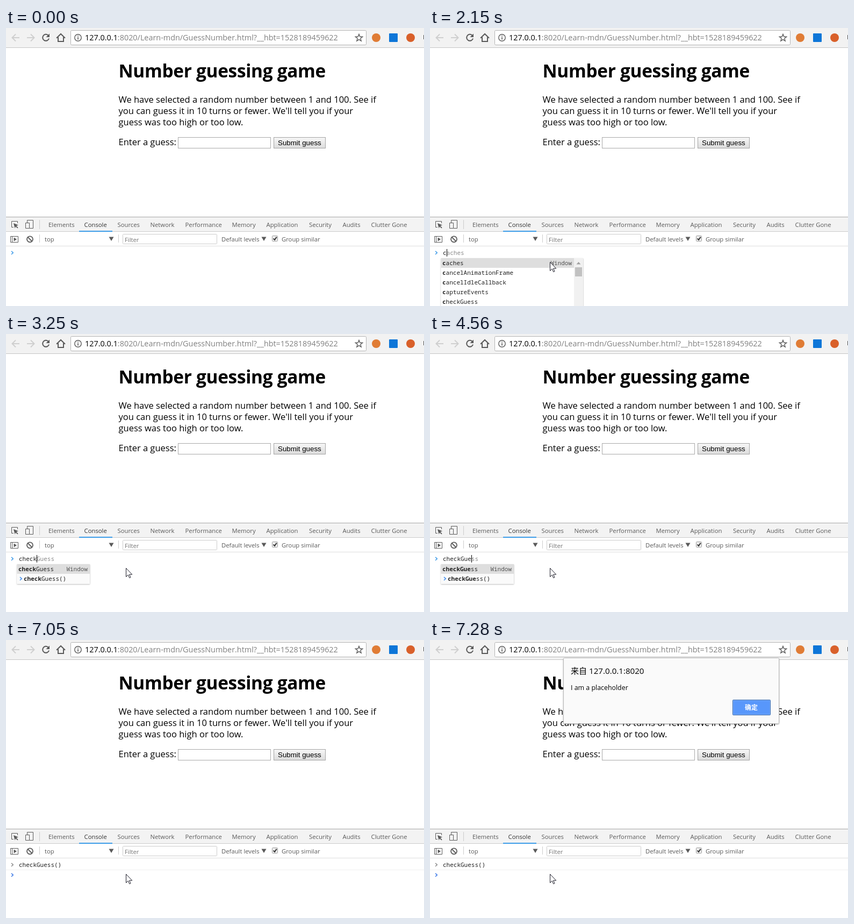
Recreate the animation shown at these times as an HTML page. Size 778 by 517 pixels, loop 8 s.

```html
<!DOCTYPE html>
<html lang="en">
<head>
<meta charset="utf-8">
<title>Number guessing game</title>
<style>
  html, body { margin: 0; width: 100%; height: 100%; overflow: hidden; background: #fff; }
  svg { display: block; }
  text { font-family: "Open Sans", "Noto Sans", "Noto Sans CJK SC", sans-serif; white-space: pre; }
  .page { font-size: 16.5px; }
  .ui { font-size: 11.3px; fill: #5a5a5a; }
  .mono { font-family: "Noto Sans Mono", "DejaVu Sans Mono", monospace; font-size: 11px; fill: #222; }
  .line { fill: none; stroke: #5a5a5a; }
</style>
</head>
<body>
<svg id="stage" width="778" height="517" viewBox="0 0 778 517" xmlns="http://www.w3.org/2000/svg">
  <defs>
    <linearGradient id="btn" x1="0" y1="0" x2="0" y2="1">
      <stop offset="0" stop-color="#f7f7f7"/><stop offset="1" stop-color="#dcdcdc"/>
    </linearGradient>
    <filter id="shadow" x="-5%" y="-10%" width="110%" height="125%">
      <feDropShadow dx="0" dy="1" stdDeviation="1.3" flood-opacity=".35"/>
    </filter>
  </defs>
  <rect width="778" height="517" fill="#fff"/>
  <g id="browser"></g>
  <g id="page"></g>
  <g id="tools"></g>
  <g id="console"></g>
  <g id="popup"></g>
  <path id="cursor" d="M.5 .5V16.5L4.2 13L6.8 18.6L9 17.6L6.5 12.2H11.7Z" fill="#fff" stroke="#1c1c28"/>
  <g id="dialog"></g>
</svg>
<script>
const LOOP = 8000, CHAR = 6.6, COMMAND = 'checkGuess()';
const KEYS = [2150, 2310, 2770, 3090, 3250, 4020, 4330, 4560, 4870, 5030, 5960, 6270];
const SUBMIT = 7050, BLINK = 535;

const el = id => document.getElementById(id);
const text = (x, y, str, cls, attrs = '') => `<text x="${x}" y="${y}" class="${cls}" ${attrs}>${str}</text>`;
const rect = (x, y, w, h, fill, attrs = '') =>
  `<rect x="${x}" y="${y}" width="${w}" height="${h}" fill="${fill}" ${attrs}/>`;
const box = (x, y, w, h, fill, stroke, rx = 0) =>
  rect(x + .5, y + .5, w - 1, h - 1, fill, `stroke="${stroke}" rx="${rx}"`);
const line = (d, attrs = '') => `<path class="line" d="${d}" ${attrs}/>`;
const fillPath = (d, fill) => `<path d="${d}" fill="${fill}"/>`;
const chevron = (x, y, color) =>
  `<path d="M${x} ${y - 3}l3.2 3l-3.2 3" fill="none" stroke="${color}" stroke-width="1.6"/>`;

function star(cx, cy, outer, inner) {
  const pts = Array.from({ length: 10 }, (_, i) => {
    const r = i % 2 ? inner : outer, a = i * Math.PI / 5 - Math.PI / 2;
    return (cx + r * Math.cos(a)).toFixed(2) + ' ' + (cy + r * Math.sin(a)).toFixed(2);
  });
  return 'M' + pts.join('L') + 'Z';
}

function drawBrowser() {
  const pale = 'style="stroke:#cfcfcf" stroke-width="2"', dark = 'stroke-width="2"';
  el('browser').innerHTML =
    rect(0, 0, 778, 36, '#f2f2f2') + rect(0, 36, 778, 1, '#c4c4c4') +
    line('M25 18H12M18 11.5L11.5 18L18 24.5', pale) +
    line('M39 18H52M46 11.5L52.5 18L46 24.5', pale) +
    line('M78.3 13.4A6 6 0 1 0 80 19.5', dark) + fillPath('M81 10.5V17H74.5Z', '#5a5a5a') +
    line('M94 18.7L102 11L110 18.7M97 17V25H107V17', dark) +
    box(120, 4, 551, 28, '#fff', '#b4b4b4', 2) +
    '<circle class="line" cx="134" cy="18" r="6.2" stroke-width="1.4"/>' +
    rect(133.2, 17, 1.6, 4.5, '#5a5a5a') + rect(133.2, 14.2, 1.6, 1.6, '#5a5a5a') +
    text(147, 23, '127.0.0.1<tspan fill="#808080">:8020/Learn-mdn/GuessNumber.html?__hbt=1528189459622</tspan>',
      '', 'font-size="14.4"') +
    line(star(657, 18.4, 7, 3), 'stroke-width="1.4"') +
    '<circle cx="689" cy="18" r="8" fill="#e07c35"/>' +
    rect(713, 10, 16, 16, '#0e76d8', 'rx="1"') +
    '<circle cx="753" cy="18" r="8" fill="#d9602a"/>' +
    rect(777, 13, 1, 8, '#555');
}

function drawPage() {
  el('page').innerHTML =
    text(209.5, 92, 'Number guessing game', '', 'font-size="33.4" font-weight="700" letter-spacing="-.3"') +
    ['We have selected a random number between 1 and 100. See if',
     "you can guess it in 10 turns or fewer. We'll tell you if your",
     'guess was too high or too low.'].map((s, i) => text(209.5, 139 + 21 * i, s, 'page')).join('') +
    text(209.5, 218, 'Enter a guess:', 'page') +
    box(320, 203, 173, 21, '#fff', '#a9a9a9') +
    box(498, 203, 97, 21, 'url(#btn)', '#a4a4a4') +
    text(506, 218, 'Submit guess', '', 'font-size="13.33" style="font-family:\'Liberation Sans\',Arial,sans-serif"');
}

function drawTools() {
  const tabs = [[79, 'Elements'], [145.5, 'Console'], [207.5, 'Sources'], [268.5, 'Network'],
    [333.5, 'Performance'], [420.5, 'Memory'], [484.5, 'Application'], [564, 'Security'],
    [626.5, 'Audits'], [679.5, 'Clutter Gone']];
  el('tools').innerHTML =
    rect(0, 351, 778, 27, '#f3f3f3') + rect(0, 351, 778, 1, '#a6a6a6') +
    rect(0, 378, 778, 1, '#cccccc') + rect(0, 405, 778, 1, '#dddddd') +
    rect(136, 377, 62, 2, '#3e9de8') +
    tabs.map(([x, s]) => text(x, 370, s, 'ui', s === 'Console' ? 'style="fill:#333"' : '')).join('') +
    [[62, 357, 17], [62, 384, 15], [209, 384, 15]].map(([x, y, h]) => rect(x, y, 1, h, '#cccccc')).join('') +
    line('M14 370.5H10.5V359.5H21.5V363') + fillPath('M14 363L23 366.5L19.3 368L22.6 371.3L21.3 372.6L18 369.2L16.6 372.5Z', '#5a5a5a') +
    line('M39.5 362V357.5H50.5V372.5H44M36.5 362.5H43.5V372.5H36.5Z') +
    line('M8.5 387.5H22.5V398.5H8.5ZM11.5 387V399') + fillPath('M14.5 389.5L20 393L14.5 396.5Z', '#5a5a5a') +
    line('M40.3 388.7L48.7 397', 'stroke-width="1.8"') +
    '<circle class="line" cx="44.5" cy="392.8" r="5.5" stroke-width="1.8"/>' +
    text(72, 397, 'top', 'ui') +
    fillPath('M191.5 388.5H200.5L196 396Z', '#5a5a5a') +
    box(217, 383, 176, 19, '#fff', '#cccccc', 1) +
    text(221, 398, 'Filter', 'ui', 'style="fill:#757575"') +
    text(401, 397, 'Default levels', 'ui') +
    fillPath('M475.5 388.5H484.5L480 396Z', '#5a5a5a') +
    box(495, 386, 11, 11, '#f0f0f0', '#9a9a9a', 1) +
    line('M497.6 391.5L500 394L503.8 388.6', 'style="stroke:#333" stroke-width="2"') +
    text(513, 397, 'Group similar', 'ui');
}

function drawDialog() {
  el('dialog').innerHTML =
    `<g filter="url(#shadow)">${box(248, 33, 402, 123, '#fafafa', '#bcbcbc', 2)}</g>` +
    text(262, 63, '来自 127.0.0.1:8020', '', 'font-size="15.1"') +
    text(262, 93, 'I am a placeholder', '', 'font-size="12.4"') +
    box(563, 111, 71, 29, '#5897fb', '#2f62a8', 1) +
    rect(564.5, 112.5, 68, 26, 'none', 'stroke="#80b2ff"') +
    text(586, 130, '确定', '', 'font-size="12" font-weight="700" fill="#fff"');
}

// Completion list for a prefix: rows, right edge and scroll thumb height
function completions(n) {
  if (n === 1) return { right: 285, thumb: 17,
    rows: ['caches', 'cancelAnimationFrame', 'cancelIdleCallback', 'captureEvents', 'checkGuess'] };
  if (n === 2) return { right: 252, thumb: 44,
    rows: ['checkGuess', 'ChannelMergerNode', 'ChannelSplitterNode', 'CharacterData', 'ApplicationCache'] };
  if (n === 3) return { right: 219, thumb: 90,
    rows: ['checkGuess', 'ApplicationCache', 'ApplicationCacheErrorEvent', 'AudioScheduledSourceNode', 'Cache'] };
  return { right: 156, rows: ['checkGuess', COMMAND] };
}

function emphasize(word, part) {
  const i = word.toLowerCase().indexOf(part.toLowerCase()), j = i + part.length;
  return `${word.slice(0, i)}<tspan font-weight="700">${word.slice(i, j)}</tspan>${word.slice(j)}`;
}

function popup(n) {
  if (n < 1 || n > 10) return '';
  const { right, thumb, rows } = completions(n), prefix = COMMAND.slice(0, n);
  const bar = right - 17, end = thumb ? bar : right;
  return `<g filter="url(#shadow)">${rect(20.5, 428, right - 20.5, thumb ? 100 : 36.5, '#fff')}</g>` +
    (thumb ? '' : rect(20.5, 446, right - 20.5, 18.5, '#fafafa')) +
    rect(20.5, 428, end - 20.5, 18, '#dedede') +
    rows.map((word, i) => {
      const past = word === COMMAND;
      return (past ? chevron(26, 455, '#3f8df0') : '') +
        text(past ? 33 : 23, 441 + 18 * i, emphasize(word, prefix), 'mono');
    }).join('') +
    text(end - 4, 441, 'Window', 'mono', 'text-anchor="end" style="fill:#555"') +
    (thumb ? rect(bar, 428, 17, 90, '#f1f1f1') + rect(bar + 2, 445, 13, thumb, '#c1c1c1') +
      fillPath(`M${bar + 4.5} 439.5h8l-4 -4.5z`, '#a0a0a0') : '');
}

function prompt(n, caret, sent) {
  if (sent) {
    return chevron(10, 418, '#8c8c8c') + text(24, 422, COMMAND, 'mono') +
      rect(0, 427, 778, 1, '#f0f0f0') + chevron(10, 437, '#3b78e7');
  }
  const open = n === 11;
  const typed = open ? 'checkGuess<tspan fill="#a83a3a">(</tspan>' : COMMAND.slice(0, n);
  const word = n === 1 ? 'caches' : 'checkGuess';
  const ghost = n ? word.slice(n) : '';
  return chevron(10, 418, '#3f9be8') +
    (open ? rect(90, 411, 7, 14, '#fff3f3') + line('M90 425.5H97', 'style="stroke:#d98a8a" stroke-dasharray="1 1"') : '') +
    text(24, 422, `${typed}<tspan fill="#8a8a8a">${ghost}</tspan>`, 'mono') +
    (caret ? rect(24 + Math.round(CHAR * n), 411, 1, 14, '#000') : '');
}

let shown = '';
function draw(t) {
  const n = KEYS.filter(k => k <= t).length;
  const last = n ? KEYS[n - 1] : 760;
  const caret = t >= last && Math.floor((t - last) / BLINK) % 2 === 0;
  const sent = t >= SUBMIT;
  const state = [n, caret, sent].join();
  if (state !== shown) {
    shown = state;
    el('console').innerHTML = prompt(n, caret, sent);
    el('popup').innerHTML = popup(n);
  }

  // The pointer glides in from the lower right in coarse steps
  const step = Math.min(3, Math.floor((t - 70) / 73));
  const rest = Math.pow(1 - Math.max(0, step) / 3, 1.6);
  el('cursor').setAttribute('transform',
    `translate(${Math.round(223 + 363 * rest)} ${Math.round(435 + 65 * rest)})`);
  el('cursor').setAttribute('visibility', t < 70 ? 'hidden' : 'visible');

  // The alert fades in while dropping into place
  const phase = Math.max(0, Math.min(3, Math.floor((t - SUBMIT + 5) / 75)));
  el('dialog').setAttribute('opacity', [0, .5, .85, 1][phase]);
  el('dialog').setAttribute('transform', `translate(0 ${[-11, -11, -3, 0][phase]})`);
}

drawBrowser();
drawPage();
drawTools();
drawDialog();
const start = performance.now();
function tick() {
  draw((performance.now() - start) % LOOP);
  requestAnimationFrame(tick);
}
tick();
</script>
</body>
</html>
```
